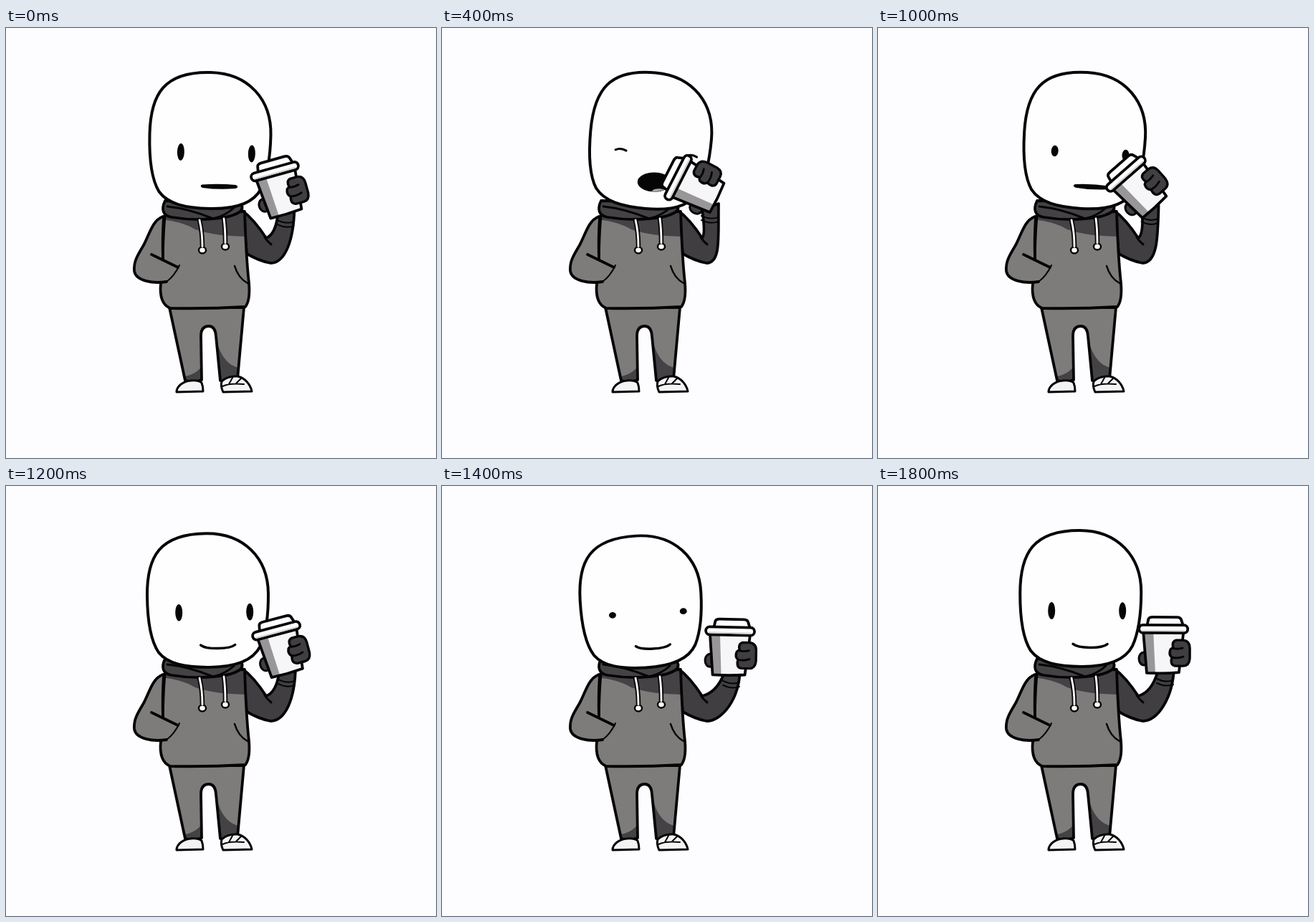
Recreate the animation shown at these times as an HTML page with a canvas. Size 600 px wide and 600 px high, loop 1.9 s.

```html
<!DOCTYPE html>
<html lang="en">
<head>
<meta charset="utf-8">
<title>Coffee sip</title>
<style>
  html, body { margin: 0; width: 100%; height: 100%; overflow: hidden; background: #fdfcff; }
  canvas { display: block; width: 600px; height: 600px; }
</style>
</head>
<body>
<canvas id="stage" width="600" height="600"></canvas>
<script>
const ctx = document.getElementById('stage').getContext('2d');
const STEP = 100, STEPS = 19;
const INK = '#050505', PAPER = '#fdfcff', WHITE = '#fefefe';
const CLOTH = '#7e7c7b', SHADE = '#444245', GLOVE = '#403e41';

const clamp = v => Math.min(1, Math.max(0, v));
const progress = (from, to, t) => clamp((t - from) / (to - from));
function ease(from, to, t) {
  const u = progress(from, to, t);
  return u * u * (3 - 2 * u);
}

// The lift starts at the end of the previous loop, so steps run from -1 to 17.
function poseAt(index) {
  const step = (index + 1) % STEPS - 1;
  const sip = ease(-1.4, 2.7, step) - ease(7.2, 14.4, step);
  const dip = Math.sin(Math.PI * progress(10.5, 18, step));
  return {
    x: 401 - 71 * sip - 34 * sip * (1 - sip) + 2 * dip,
    y: 200 + 9 * sip * sip + 3 * dip,
    tilt: (2 - 65 * sip) * Math.PI / 180,
    lean: (5.2 * sip - 3.3 * dip) * Math.PI / 180,
    stretch: 1 - .03 * dip,
    eye: Math.min(12, 23 * (1 - sip), 4.5 * Math.abs(step - 15)),
    mouth: 13 * sip ** 6,
    happy: step < 0 || step > 10
  };
}

function shape(d, fill, width = 3.8) {
  const path = typeof d === 'string' ? new Path2D(d) : d;
  if (fill) { ctx.fillStyle = fill; ctx.fill(path); }
  if (width) { ctx.strokeStyle = INK; ctx.lineWidth = width; ctx.stroke(path); }
}
const line = (d, width) => shape(d, null, width);

function ellipse(x, y, rx, ry, fill, width) {
  const path = new Path2D();
  path.ellipse(x, y, rx, ry, 0, 0, Math.PI * 2);
  shape(path, fill, width);
}

function box(x, y, w, h, r, fill, width) {
  const path = new Path2D();
  path.roundRect(x, y, w, h, r);
  shape(path, fill, width);
}

// Fills an outline, darkens the parts of it under the shadows, then strokes it.
function shaded(outline, shadows) {
  const path = new Path2D(outline);
  shape(path, CLOTH, 0);
  ctx.save();
  ctx.clip(path);
  shape(shadows, SHADE, 0);
  ctx.restore();
  line(path);
}

function drawLegs() {
  shaded('M228 390 L250 492 Q262 495 273 491 L272 430 Q272 416 283 416 Q292 416 293 430 L299 492 Q311 495 323 490 L332 390 Z',
    'M244 487 Q266 485 276 468 V500 H244 Z M291 420 Q297 470 328 475 V500 H296 Z');
  shape('M238 508 C238 499 248 493 258 492 Q268 491 273 495 Q275 500 275 507 Z', '#f4f3f4', 3);
  shape('M303 508 Q299 500 301 493 Q309 485 323 486 C333 488 341 497 343 507 Z', '#f4f3f4', 3);
  line('M302 500 Q312 495 332 497 M311 497 L316 488 M321 496 L328 489', 2);
}

function drawArm({ x, y, tilt }) {
  const s = -Math.sin(tilt), wx = x + 46 * s + 3, wy = y + 66 - 20 * s * s;
  shape(`M330 255 Q346 267 363 293 Q${wx / 2 + 181} 288 ${wx - 11} ${wy - 6}
    L${wx + 12} ${wy - 14} C${wx + 11} ${wy + 30} 390 328 369 328 Q353 325 336 315 Z`, GLOVE);
  line('M361 292 Q364 297 370 302', 3);
  for (const dy of [3, 9]) line(`M${wx - 12} ${wy + dy} q12 6 23 2`, 2);
}

function drawTorso() {
  shaded('M222 260 C218 290 220 330 216 356 Q213 384 229 391 Q282 392 334 389 Q341 380 339 356 Q335 320 333 256 Z',
    'M216 267 Q246 270 264 281 Q292 291 342 291 V240 H216 Z');
  line('M319 332 Q324 349 337 356', 2.5);
  const sleeve = 'M219 263 C204 269 201 286 192 303 C183 318 178 326 179 339 C181 353 205 357 224 354';
  shape(sleeve + ' L241 334 L219 323 Z', CLOTH, 0);
  line(sleeve);
  line('M220 264 Q218 294 219 322 M203 316 L240 334');
  line('M242 331 Q235 346 224 354', 2);

  shape('M222 241 C216 253 219 262 231 264 Q262 269 290 266 Q318 264 328 255 Q332 249 326 243 Z', SHADE);
  line('M225 249 Q255 252 289 266 Q306 262 318 251', 3);
  for (const [x, y, dx, length] of [[270, 268, 4, 42], [304, 266, 2, 39]]) {
    const cord = new Path2D(`M${x} ${y} q${dx} ${length - 25} ${dx} ${length - 5}`);
    line(cord, 6.5);
    ellipse(x + dx, y + length, 5, 4.5, WHITE, 2.5);
    ctx.strokeStyle = WHITE;
    ctx.lineWidth = 2.8;
    ctx.stroke(cord);
  }
}

function drawMouth(open, happy) {
  if (happy) return line('M272 220.5 C280 227 312 227 320 220.5', 3.5);
  if (open < 4) return shape('M273 219.5 Q296 217 320 219 Q324 221 319 222.5 Q296 225 274 222.5 Q270 221 273 219.5 Z', INK, 1.5);
  const y = 222 - open * .6, path = new Path2D();
  path.ellipse(293, y, 23, open, -.08, 0, Math.PI * 2);
  shape(path, INK, 1);
  ctx.save();
  ctx.clip(path);
  ellipse(302, y + 13, 11, 4.5, '#aaa8aa', 0);
  ctx.restore();
}

function drawHead({ lean, stretch, eye, mouth, happy }) {
  ctx.save();
  ctx.translate(285, 250 + (1 - stretch) * 50);
  ctx.rotate(lean);
  ctx.scale(1, stretch);
  ctx.translate(-285, -250);
  shape('M281 62 C334 62 367 98 367 148 C367 178 364 203 355 223 C344 245 315 252 284 252 C250 252 226 247 213 230 C202 213 198 182 198 150 C198 94 216 62 281 62 Z', WHITE, 4);
  for (const x of [242, 341]) {
    if (eye < 1) line(`M${x - 7} 174 q7 -4 15 0`, 3);
    else ellipse(x, 174, 5, Math.max(4, eye), INK, 0);
  }
  drawMouth(mouth, happy);
  ctx.restore();
}

function drawCup({ x, y, tilt }) {
  ctx.save();
  ctx.translate(x, y);
  ctx.rotate(tilt);
  ellipse(-27, 41, 7, 9, GLOVE, 3);
  const body = 'M-28 4 L-23 61 Q0 62 22 60 L28 4 Z';
  shape(body, '#f6f5f7', 0);
  shape('M-28 4 L-23 61 H-11 L-14 4 Z', '#989698', 0);
  line(body);
  shape('M-23 -4 L-21 -14 Q-20 -17 -15 -17 H19 Q24 -17 25 -13 L28 -4 Z', WHITE);
  box(-34, -6, 68, 11, 5.5, WHITE);
  box(-30, 1, 60, 2, 1, '#d4d2d4', 0);
  shape('M18 15 H28 Q37 16 37 26 V41 Q36 51 28 51 H17 Q9 50 12 39 Q7 35 10 28 Q12 26 14 26 Q11 17 18 15 Z', GLOVE, 3.4);
  line('M14 26.5 Q20 28 27 26 M12 39 Q20 41 28 38', 2.8);
  ctx.restore();
}

function draw(now) {
  const pose = poseAt(Math.floor(now / STEP) % STEPS);
  ctx.fillStyle = PAPER;
  ctx.fillRect(0, 0, 600, 600);
  ctx.lineCap = ctx.lineJoin = 'round';
  drawLegs();
  drawArm(pose);
  drawTorso();
  drawHead(pose);
  drawCup(pose);
}

const start = performance.now();
function tick() {
  draw(performance.now() - start);
  requestAnimationFrame(tick);
}
tick();
</script>
</body>
</html>
```
